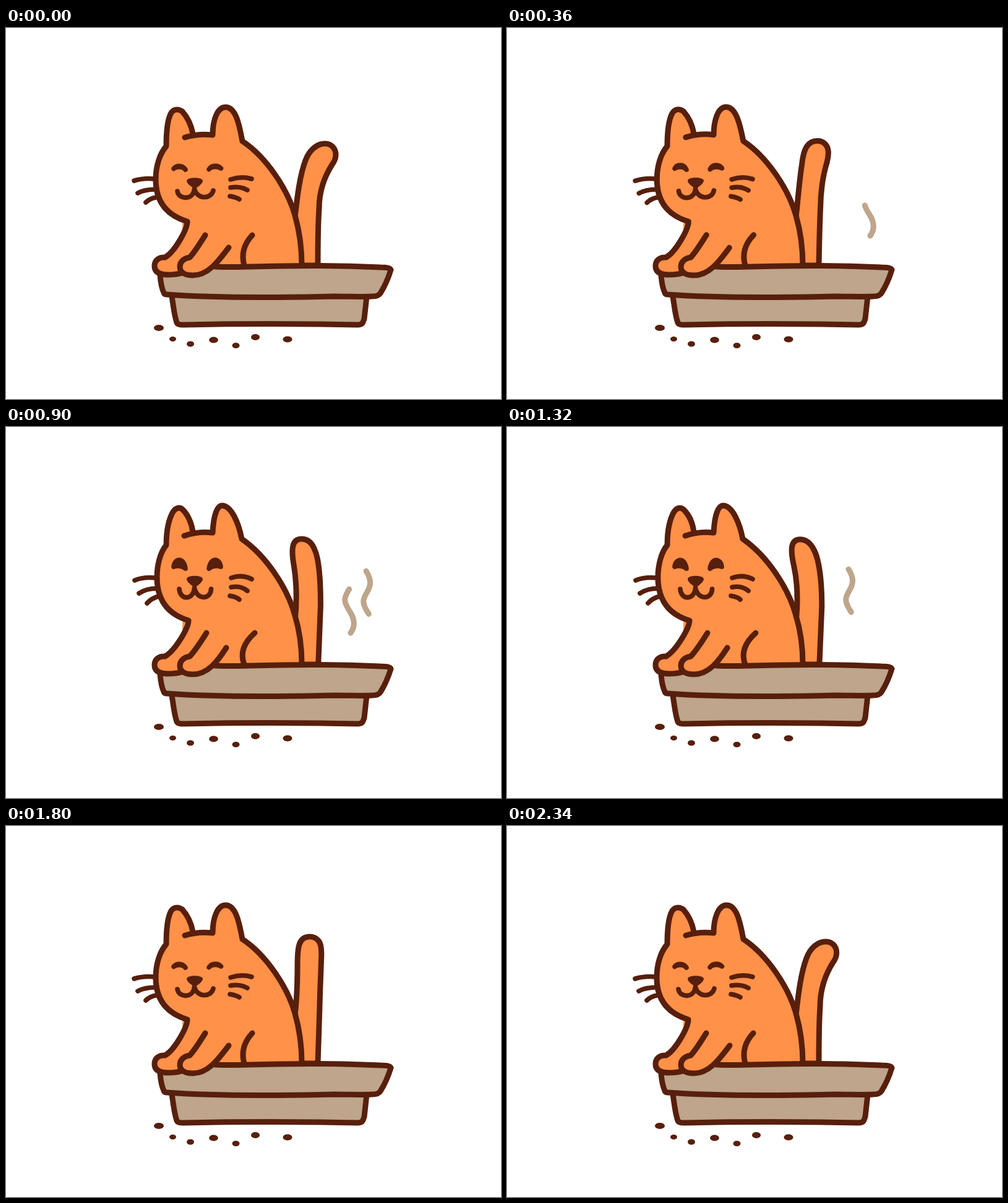
Write an HTML page without scripts that moves like this. It is 800x600 px and loops after 2400 ms.

```html
<!DOCTYPE html>
<html lang="en">
<head>
<meta charset="utf-8">
<title>Cat in a litter tray</title>
<style>
  html, body { margin: 0; width: 100%; height: 100%; overflow: hidden; background: #fff; }
  svg { display: block; width: 100%; height: 100%; }
  .ink { stroke: #571f0c; stroke-width: 9; stroke-linecap: round; stroke-linejoin: round; fill: none; }
  .fur { fill: #ff9149; }
  .sand { fill: #bea58b; }
  .dark { fill: #571f0c; }
  .thin { stroke-width: 7.6; }

  .pose { d: var(--a); animation: pose 2.4s cubic-bezier(.33, 0, .67, 1) infinite; }
  @keyframes pose {
    0%, 10%, 73.3%, 100% { d: var(--a); }
    30%, 53.3% { d: var(--b); }
  }

  .tail {
    --right: path("M467 306C470 280 474 240 484 214C490 198 502 187 516 187C526 187 533 195 533 205C533 212 530 217 527 221C513 243 506 268 506 292C504 320 504 352 504 384L470 384");
    --mid: path("M467 306C470 280 471 255 471 225C471 195 473 179 491 179C502 179 508 187 509 196C510 203 510 207 509.5 215C509 235 507.5 265 507 290C506 320 505 352 504 384L470 384");
    --left: path("M468 306C470 280 469 250 463 225C456 198 457 182 472 182C480 182 487 187 492 194C496 200 499 207 501 214C507 236 509 262 509 290C507.5 320 506.5 352 505 384L470 384");
    d: var(--right);
    animation: sway 2.4s infinite;
  }
  @keyframes sway {
    0% { d: var(--right); animation-timing-function: cubic-bezier(.3, .2, .7, .7); }
    25% { d: var(--mid); animation-timing-function: cubic-bezier(.3, .4, .6, 1); }
    50% { d: var(--left); animation-timing-function: cubic-bezier(.4, .1, .7, .7); }
    75% { d: var(--mid); animation-timing-function: cubic-bezier(.3, .3, .6, 1); }
    100% { d: var(--right); }
  }

  .wisp {
    fill: none; stroke: #bea58b; stroke-width: 9; stroke-linecap: round;
    stroke-dasharray: 100 300; stroke-dashoffset: 104;
    filter: blur(.6px);
    animation: rise 2.4s linear infinite;
  }
  .late { animation-delay: -1.98s; }
  @keyframes rise {
    0%, 2.5% { stroke-dashoffset: 104; }
    27.5%, 29.2% { stroke-dashoffset: 0; }
    56%, 100% { stroke-dashoffset: -104; }
  }
</style>
</head>
<body>
<svg viewBox="0 0 800 600">
  <defs>
    <path id="steam" pathLength="100" d="M587 336C595 325 593 313 586 302C575 285 576 280 583 268C591 255 590 246 582 233"/>
  </defs>

  <use href="#steam" class="wisp"/>
  <use href="#steam" class="wisp late" x="-30" y="-3"/>

  <path class="ink fur tail"/>

  <!-- tray -->
  <g class="ink sand">
    <path d="M268 434C271 453 272 464 275 473C276 480 280 480 288 480C380 478 470 478 568 480C576 480 577 477 579 470L583 434"/>
    <path stroke="none" d="M249 387H622L604 432H258Z"/>
    <path d="M249 400C250 412 252 422 255 428Q256 431 260 431C340 437 440 436 530 434C555 434 575 435 592 434Q602 434 605 429C612 418 618 404 622 391"/>
  </g>

  <!-- body -->
  <path class="fur" d="M289 178L302 171L478 384L340 386L302 400L283 396Z"/>
  <path class="ink fur pose" style="
    --a:path('M478 384C478 358 475 331 467 303C455 260 420 208 382 183C378 163 373 128 355 128C341 128 334 150 334 173C318 171 302 173 289 177M302 171C299 155 293 144 285 135C278 130 270 131 266 139C260 151 259 170 259 191C248 204 242 224 242 245C242 284 263 304 293 313C293 325 273 362 257 371C247 370 240 376 240 385C240 396 250 399 262 399C271 399 278 398 285 396');
    --b:path('M478 384C478 358 475 331 467 305C455 260 420 208 381 181C376 155 364 127 349 127C339 128 335 150 334 171C318 169 302 171 288 176M302 170C300 154 293 141 286 134C281 129 275 130 270 137C262 151 259 170 259 191C249 203 244 224 244 243C244 284 265 304 295 313C295 325 273 362 257 371C247 370 240 376 240 385C240 396 250 399 262 399C271 399 278 398 285 396')"/>
  <path class="ink pose" style="
    --a:path('M398 335C384 350 380 366 385 384');
    --b:path('M402 333C384 349 378 366 385 384')"/>
  <path class="ink" d="M338 386C376 388 410 385 445 385C500 384 560 385 605 387Q622 387 621 391"/>
  <path class="ink fur pose" style="
    --a:path('M322 335C313 349 306 361 297 371C288 372 281 378 281 386C281 396 290 400 302 400C326 400 342 379 360 355');
    --b:path('M324 333C314 349 306 361 297 371C288 372 281 378 281 386C281 396 290 400 302 400C326 400 342 379 356 357')"/>

  <!-- face -->
  <g class="ink thin">
    <g class="dark">
      <path class="pose" style="
        --a:path('M271 227.5C275 222 285 221 290 229C285 223 275 224 271 227.5Z');
        --b:path('M271 226C272 213 287 209 290 229C285 224 276 224 271 226Z')"/>
      <path class="pose" style="
        --a:path('M328 228.5C333 221 343 222 347.5 227C343 224 333 223 328 228.5Z');
        --b:path('M328 229C331 209 346 213 347 226C342 224 333 224 328 229Z')"/>
      <path class="pose" stroke="none" style="stroke:none;
        --a:path('M292 247C292 240.5 318 240.5 318 247C318 252 309 258 305 260C300 257 292 252 292 247Z');
        --b:path('M292 246C292 239 318 239 318 246C318 251 309 257 305 260C300 256 292 251 292 246Z')"/>
    </g>
    <path class="pose" style="
      --a:path('M277 264C279 278 303 279 304.5 260C308 277 331 278 335 263');
      --b:path('M280 262C281 280 303 281 304.5 260C308 280 331 280 331.5 262')"/>
    <path class="pose" style="
      --a:path('M207 247C220 243 230 243 240 244M213 267C222 262 232 261 242 261M226 282C231 277 236 275 242 274');
      --b:path('M208 248C220 243 231 243 242 244M215 269C224 263 233 261 244 261M228 285C233 279 239 276 246 274')"/>
    <path class="pose" style="
      --a:path('M363 245C375 241 387 241 397 244M363 258C374 256 383 258 390 262M362 272C368 273 373 274 377 277');
      --b:path('M364 244C375 240 387 241 397 246M364 259C374 257 383 259 390 265M362 273C368 274 373 275 377 279')"/>
  </g>

  <!-- crumbs -->
  <g class="dark">
    <ellipse cx="247" cy="485" rx="8" ry="5"/>
    <ellipse cx="269.5" cy="503" rx="5.5" ry="4"/>
    <ellipse cx="298" cy="511" rx="6" ry="4.5"/>
    <ellipse cx="335.5" cy="504.5" rx="7.3" ry="5"/>
    <ellipse cx="371.5" cy="513.5" rx="6" ry="4.5"/>
    <ellipse cx="403" cy="500" rx="7" ry="5"/>
    <ellipse cx="455" cy="503.5" rx="7.5" ry="5"/>
  </g>
</svg>
</body>
</html>
```
